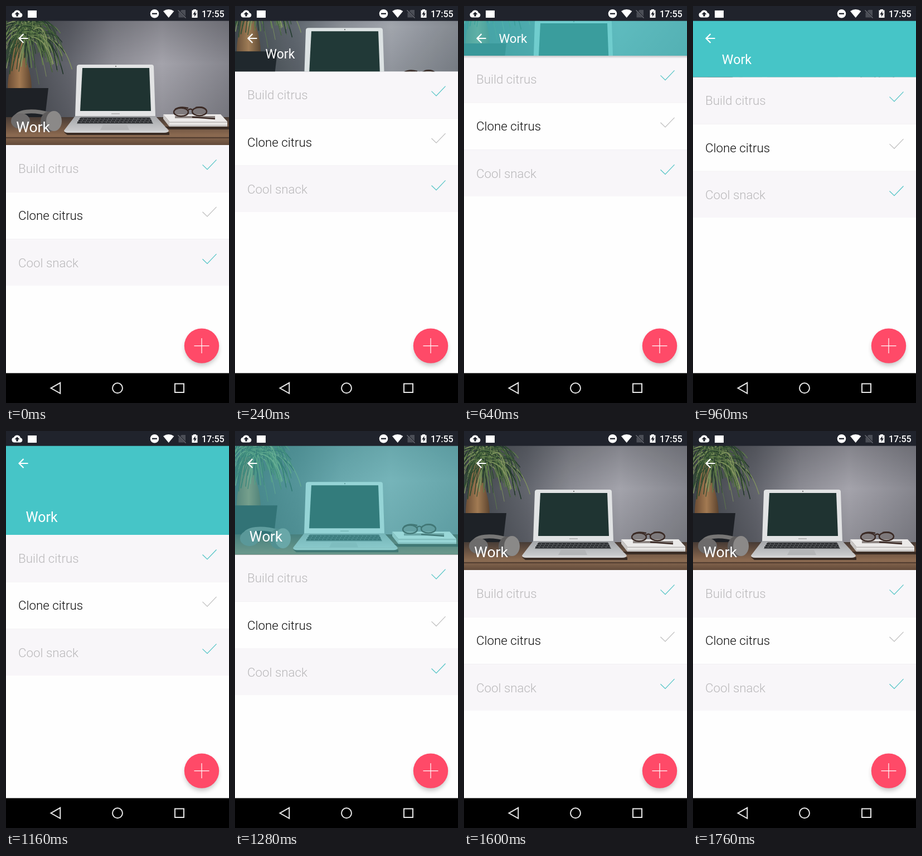
Write an HTML page that moves like this. It is 400 px wide and 711 px high and loops after 1800 ms.

```html
<!DOCTYPE html>
<html lang="en">
<head>
<meta charset="utf-8">
<title>Collapsing header</title>
<style>
html, body { margin: 0; width: 100%; height: 100%; overflow: hidden; background: #fefefe; }
svg { display: block; width: 100%; height: 100%; }
text { font-family: Roboto, "Noto Sans", sans-serif; }
</style>
</head>
<body>
<svg id="stage" viewBox="0 0 400 711">
  <defs>
    <clipPath id="headerClip"><rect id="headerBox" y="26" width="400" height="223"/></clipPath>
    <linearGradient id="wall">
      <stop offset="0" stop-color="#3f4349"/>
      <stop offset=".28" stop-color="#62646c"/>
      <stop offset=".48" stop-color="#8b8b93"/>
      <stop offset=".7" stop-color="#a4a3ab"/>
      <stop offset="1" stop-color="#85858d"/>
    </linearGradient>
    <linearGradient id="shade" x2="0" y2="1">
      <stop offset="0" stop-color="#17191e" stop-opacity=".22"/>
      <stop offset=".4" stop-color="#17191e" stop-opacity="0"/>
      <stop offset="1" stop-color="#17191e" stop-opacity=".18"/>
    </linearGradient>
    <linearGradient id="desk" x2="0" y2="1">
      <stop offset="0" stop-color="#473b35"/>
      <stop offset=".5" stop-color="#7d5f49"/>
      <stop offset=".64" stop-color="#8b6a51"/>
      <stop offset="1" stop-color="#614939"/>
    </linearGradient>
    <linearGradient id="trunk">
      <stop offset="0" stop-color="#6b4c34"/>
      <stop offset=".5" stop-color="#a37a52"/>
      <stop offset="1" stop-color="#5c432e"/>
    </linearGradient>
    <linearGradient id="silver" x2="0" y2="1">
      <stop offset="0" stop-color="#a3a5a8"/>
      <stop offset="1" stop-color="#c9cacc"/>
    </linearGradient>
    <linearGradient id="drop" x2="0" y2="1">
      <stop offset="0" stop-color="#000" stop-opacity=".2"/>
      <stop offset="1" stop-color="#000" stop-opacity="0"/>
    </linearGradient>
    <filter id="blur" x="-30%" y="-30%" width="160%" height="160%"><feGaussianBlur stdDeviation="4.5"/></filter>
  </defs>

  <rect width="400" height="711" fill="#fefefe"/>
  <g id="list"></g>
  <rect id="shadow" y="89" width="400" height="5" fill="url(#drop)"/>

  <g clip-path="url(#headerClip)">
    <g id="photo">
      <rect width="400" height="250" fill="url(#wall)"/>
      <rect y="27" width="400" height="190" fill="url(#shade)"/>
      <rect y="199" width="400" height="51" fill="url(#desk)"/>
      <path d="M0 236H400" stroke="#513c2f" stroke-width="2"/>
      <!-- plant -->
      <path d="M12 60H30C30 95 46 110 46 149H3C3 118 13 98 12 60Z" fill="url(#trunk)"/>
      <path d="M0 147H76L70 199H0Z" fill="#1e2126"/>
      <g id="leaves" fill="none" stroke-linecap="round"></g>
      <!-- headphones -->
      <path d="M16 204C18 186 50 186 78 194" fill="none" stroke="#777675" stroke-width="7"/>
      <ellipse cx="26" cy="206" rx="17" ry="14" fill="#6d6b6b"/>
      <ellipse cx="77" cy="207" rx="15" ry="18" fill="#5e5c5c"/>
      <ellipse cx="86" cy="206" rx="14" ry="18" fill="#8b8988"/>
      <!-- laptop -->
      <path d="M104 226H293V231H110Z" fill="#3a2c24"/>
      <path d="M132 105H261Q265 105 265 109L268 198H124L127 109Q127 105 132 105Z" fill="#e2e3e4"/>
      <path d="M137 111H257L260 188H133Z" fill="#1f3331"/>
      <circle cx="197" cy="108" r="1" fill="#555"/>
      <path d="M189 193H204" stroke="#aaa" stroke-width="1.5"/>
      <path d="M124 197H268L292 223H104Z" fill="url(#silver)"/>
      <path d="M104 223H292Q291 227 284 227H111Q105 227 104 223Z" fill="#d2d2d3"/>
      <path d="M134 199H258L264 211H127Z" fill="#56585b"/>
      <path d="M132 202H260M130 205H261M128 208H263" stroke="#25272a" stroke-width="2" stroke-dasharray="6 1.5"/>
      <path d="M174 213H217L221 222H169Z" fill="#b4b5b7"/>
      <!-- book and glasses -->
      <path d="M285 216H400V221H292Z" fill="#3a2c24"/>
      <path d="M282 194H385L397 207H293Z" fill="#eceae9"/>
      <path d="M282 194L293 207H397V216H293L282 202Z" fill="#c9c6c4"/>
      <path d="M293 211H397" stroke="#efedeb" stroke-width="3"/>
      <path d="M303 199H375" stroke="#8d8582" stroke-width="4"/>
      <g fill="#756a66" fill-opacity=".45" stroke="#3b2a25" stroke-width="2.4">
        <ellipse cx="314" cy="190" rx="13" ry="7.5"/>
        <ellipse cx="347" cy="189" rx="13" ry="7.5"/>
        <path d="M326 187Q331 182 335 187M303 185Q312 179 327 183M359 186Q354 179 340 182M334 199L375 202" fill="none"/>
      </g>
    </g>
    <rect id="scrim" y="26" width="400" height="223" fill="#46c5c7"/>
  </g>

  <path d="M39.5 58H24M31.5 50L23.5 58L31.5 66" fill="none" stroke="#fff" stroke-width="2.2"/>
  <text id="title" fill="#fff">Work</text>

  <!-- status bar -->
  <rect width="400" height="26.7" fill="#20232c"/>
  <g fill="#fff">
    <path d="M15 20.5A4.7 4.7 0 0 1 14.2 11.2A6.3 6.3 0 0 1 26 12.2A4.2 4.2 0 0 1 25.5 20.5Z"/>
    <path d="M20 10.5L24.5 15H21.7V18.5H18.3V15H15.5Z" fill="#20232c"/>
    <rect x="39" y="8" width="16" height="13"/>
    <circle cx="266.5" cy="13.7" r="7.8"/>
    <rect x="262" y="12.6" width="9" height="2.3" fill="#20232c"/>
    <path d="M282 9.3Q291.7 2.5 301.4 9.3L291.7 21Z"/>
    <path d="M336 7.5V6H341V7.5H343.5V21H333.5V7.5Z"/>
    <path d="M339.5 9L335.2 15.2H338V19.4L342 13.2H339.5Z" fill="#20232c"/>
    <text x="351" y="19.5" font-size="16" font-weight="500">17:55</text>
  </g>
  <path d="M309.5 20.5V12L315 7H322V20.5Z" fill="#4b4e56"/>
  <path d="M309 7.5L323 21.5" stroke="#20232c" stroke-width="3"/>
  <path d="M308.5 7.5L322.5 21.5" stroke="#6a6d74" stroke-width="1.4"/>

  <!-- action button -->
  <circle cx="351" cy="614" r="30" fill="#000" opacity=".22" filter="url(#blur)"/>
  <circle cx="351" cy="608.6" r="31.2" fill="#ff4a68"/>
  <path d="M337.5 608.6H364.5M351 595.1V622.1" stroke="#fff" stroke-width="1.2"/>

  <!-- navigation bar -->
  <rect y="657.5" width="400" height="54" fill="#000"/>
  <g fill="none" stroke="#e6e6e6" stroke-width="2">
    <path d="M80.5 684.3L97.3 674.8V693.8Z"/>
    <circle cx="200" cy="684.3" r="9"/>
    <rect x="303" y="676.5" width="16" height="15.5"/>
  </g>
</svg>

<script>
const LOOP = 1800, OPEN = 249, CLOSED = 89, ROW = 84.4;
const FADE_IN = { at: 150, length: 600 }, FADE_OUT = { at: 1190, length: 450 };
const $ = id => document.getElementById(id);
const lerp = (a, b, p) => a + (b - a) * p;
const clamp = v => Math.min(1, Math.max(0, v));

// Header bottom edge over time: [ms, y, slope]
const track = [
  [0, 249, 0], [50, 249, 0], [150, 196, -.9], [240, 118, -.75], [340, 89, 0],
  [810, 89, 0], [870, 101, .29], [960, 127, .29], [1280, 221, .29], [1400, 249, 0], [LOOP, 249, 0]
];

function headerBottom(t) {
  const i = track.findIndex(k => t < k[0]);
  const [t0, y0, m0] = track[i - 1], [t1, y1, m1] = track[i];
  const d = t1 - t0, s = (t - t0) / d, r = 1 - s;
  return y0 * (1 + 2 * s) * r * r + m0 * d * s * r * r + y1 * s * s * (3 - 2 * s) - m1 * d * s * s * r;
}

// Cubic easing with control points (x1, 0) and (x2, 1)
function ease(x, x1, x2) {
  let lo = 0, hi = 1;
  for (let i = 0; i < 24; i++) {
    const s = (lo + hi) / 2, r = 1 - s;
    if (3 * x1 * s * r * r + 3 * x2 * s * s * r + s ** 3 < x) lo = s; else hi = s;
  }
  return lo * lo * (3 - 2 * lo);
}

const progress = (t, fade) => clamp((t - fade.at) / fade.length);

function scrimAlpha(t) {
  return t < FADE_OUT.at
    ? ease(progress(t, FADE_IN), .4, 1)
    : 1 - ease(progress(t, FADE_OUT), 0, .2);
}

function buildList() {
  const rows = [["Build citrus", true], ["Clone citrus", false], ["Cool snack", true]];
  $("list").innerHTML = rows.map(([label, done], i) => `
    <g transform="translate(0 ${i * ROW})">
      <rect width="400" height="${i < 2 ? ROW : 83}" fill="${done ? "#f8f6f9" : "#fefefe"}"/>
      ${i < 2 ? `<path d="M0 ${ROW}H400" stroke="#ebe9ed"/>` : ""}
      <text x="22" y="49.9" font-size="22.3" font-weight="300" fill="${done ? "#b9b8ba" : "#0c0c0c"}">${label}</text>
      <path d="M352.5 35.4L361 43.6L377.5 26.4" fill="none" stroke="${done ? "#4fc3c4" : "#bdbdbd"}" stroke-width="1.2"/>
    </g>`).join("");
}

function buildLeaves() {
  let seed = 7;
  const rnd = () => (seed = seed * 16807 % 2147483647) / 2147483647;
  const greens = ["#22352a", "#2f4a30", "#46623a", "#5f7b49", "#83955f"];
  let out = "";
  for (let i = 0; i < 190; i++) {
    const x = 18 + rnd() * 40, y = 22 + rnd() * 38;
    const angle = rnd() * 2 * Math.PI, reach = 25 + rnd() * 42;
    const dx = Math.cos(angle) * reach, dy = Math.sin(angle) * reach * .4;
    const drop = 12 + rnd() * (Math.abs(dx) > 18 ? 62 : 18);
    out += `<path d="M${x} ${y}Q${x + dx * .7} ${y + dy - 6} ${x + dx} ${y + dy + drop}"
      stroke="${greens[i % 5]}" stroke-width="${.8 + rnd() * 1.1}"/>`;
  }
  $("leaves").innerHTML = out;
}

function render(t) {
  const y = headerBottom(t), p = (OPEN - y) / (OPEN - CLOSED);
  $("headerBox").setAttribute("height", y - 26);
  $("photo").setAttribute("transform", `translate(0 ${(y - OPEN) / 2})`);
  $("scrim").setAttribute("opacity", scrimAlpha(t));
  $("list").setAttribute("transform", `translate(0 ${y})`);
  $("shadow").setAttribute("opacity", clamp((p - .97) / .03));
  const title = $("title");
  title.setAttribute("x", lerp(18.2, 62.4, p));
  title.setAttribute("y", y - 23);
  title.setAttribute("font-size", lerp(26.6, 22.3, p));
}

buildList();
buildLeaves();
const start = performance.now();
function tick() {
  render((performance.now() - start) % LOOP);
  requestAnimationFrame(tick);
}
tick();
</script>
</body>
</html>
```
